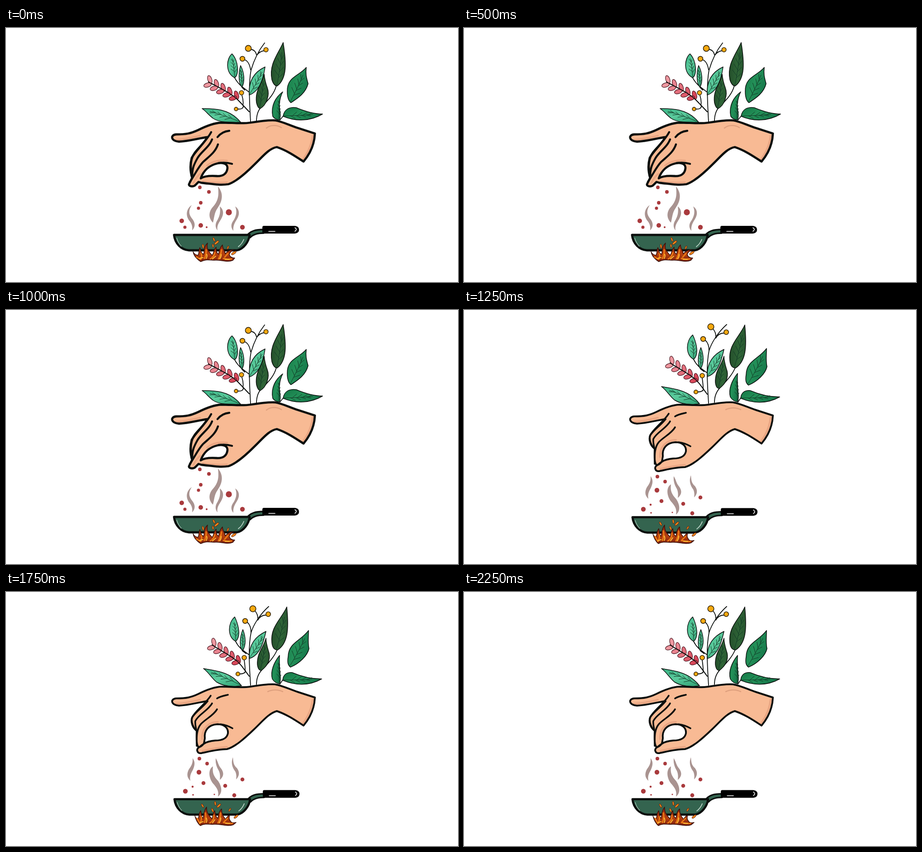
These frames come from a looping animation (998x561 px, 2.5 s). An HTML page:

```html
<!DOCTYPE html>
<html lang="en">
<head>
<meta charset="utf-8">
<title>Seasoning</title>
<style>
html, body { margin: 0; width: 100%; height: 100%; overflow: hidden; background: #fff; }
svg { display: block; width: 100%; height: 100%; }
</style>
</head>
<body>
<svg id="stage" viewBox="0 0 998 561">
  <defs>
    <linearGradient id="mint" x1="0" y1="0" x2="0.7" y2="1"><stop offset="0" stop-color="#35b283"/><stop offset=".55" stop-color="#5ccb9d"/><stop offset="1" stop-color="#39a97c"/></linearGradient>
    <linearGradient id="jade" x1="0" y1="0" x2="1" y2="0.6"><stop offset="0" stop-color="#137645"/><stop offset=".5" stop-color="#239058"/><stop offset="1" stop-color="#15774a"/></linearGradient>
    <linearGradient id="moss" x1="0" y1="0" x2="1" y2="0"><stop offset="0" stop-color="#244f2b"/><stop offset=".6" stop-color="#2f6537"/><stop offset="1" stop-color="#27552f"/></linearGradient>
    <linearGradient id="flame" x1="0" y1="0" x2="0" y2="1"><stop offset="0" stop-color="#8a2410"/><stop offset=".6" stop-color="#b5400f"/><stop offset="1" stop-color="#7c1f0d"/></linearGradient>
  </defs>
</svg>
<script>
const STEP = 250;
const INK = '#0b0f0d';

const path = (d, fill, stroke = 'none', width = 0) =>
  `<path d="${d}" fill="${fill}" stroke="${stroke}" stroke-width="${width}" stroke-linecap="round" stroke-linejoin="round"/>`;
const line = (d, width, color = INK) => path(d, 'none', color, width);
const dot = (x, y, r, fill, stroke = 'none', width = 0) =>
  `<circle cx="${x}" cy="${y}" r="${r}" fill="${fill}" stroke="${stroke}" stroke-width="${width}"/>`;
const oval = (x, y, rx, ry, turn, fill, stroke, width) =>
  `<ellipse rx="${rx}" ry="${ry}" transform="translate(${x} ${y}) rotate(${turn})" fill="${fill}" stroke="${stroke}" stroke-width="${width}"/>`;

// Midrib from base to tip, with short ribs pointing towards the tip.
function veins([x, y, tx, ty], spread) {
  const dx = tx - x, dy = ty - y;
  const at = (s, side) => `${x + dx * s - dy * side} ${y + dy * s + dx * side}`;
  let d = `M${at(0, 0)} Q${at(.45, .025)} ${at(.84, 0)}`;
  for (let i = 0; i < 4; i++) {
    const s = .2 + i * .15, w = spread * (1 - i * .17);
    d += `M${at(s, .01)}L${at(s + .13, w)}M${at(s + .05, .01)}L${at(s + .18, -w)}`;
  }
  return line(d, 1, '#123a26');
}

const leaf = ([d, tone, rib, spread]) =>
  path(d, `url(#${tone})`, INK, 1.5) + veins(rib, spread);

// Five pairs of petals along a stem.
function sprig({ upper, lower, tilt, stem }) {
  const tones = ['#ee98a0', '#e98490', '#e36f7c', '#de5b6b', '#d9485a'];
  let out = line(stem, 2);
  tones.forEach((tone, i) => {
    const k = i / 4;
    const mix = ([x, y, tx, ty]) => [x + (tx - x) * k, y + (ty - y) * k];
    out += oval(...mix(upper), 4.5, 9.3, tilt, tone, '#4a1620', 1.2);
    out += oval(...mix(lower), 8.6, 4.6, -16, tone, '#4a1620', 1.2);
  });
  return out + line(stem, 1.6);
}

const berries = list => list.map(b => dot(...b, '#f6a90f', '#33240a', 1.6)).join('');

function hand({ body, hole, folds, crease, shade, width }) {
  return path(body, '#f8ba94')
    + line(shade, 4, '#e9a683')
    + path(hole, '#fff', INK, width)
    + path(body, 'none', INK, width)
    + line(folds, width - .4)
    + line(crease, 2.6, '#dfa07e');
}

function pan(shift) {
  return `<g transform="translate(${shift} ${shift * .6})">`
    + path('M530 461C539 447 553 445 569 445V453C556 453 546 455 539 463Z', '#34644f', INK, 3.4)
    + path('M371 457H538C536 472 525 488 510 491H404C387 490 373 476 371 457Z', '#34644f', INK, 4.8)
    + path('M569 437H638Q647 438 647 445.500Q647 453 638 454H569Q566 454 566 450V441Q566 437 569 437Z', '#000')
    + line('M580 449.300H594', 1.5, '#fff') + line('M638 441Q644 445 638 449', 1.6, '#fff')
    + line('M377 464Q380 475 387 482', 1.4, '#9dbfae') + line('M525 467Q521 477 513 483', 1.7, '#c3d8cd')
    + '</g>';
}

const fire = ({ outer, inner, core, sparks }) =>
  path(outer, 'url(#flame)', '#3c120b', 1.5)
  + line(inner, 3, '#ec7914') + line(core, 2, '#ffc13a')
  + sparks.map(([x, y, turn, size]) => oval(x, y, size, size * .38, turn, '#f48a18', '#6b220d', 1)).join('');

function draw(p) {
  return line(p.stems, 1.8)
    + p.leaves.map(leaf).join('') + sprig(p.sprig) + berries(p.berries)
    + hand(p.hand)
    + p.steam.map(d => path(d, '#a99390')).join('')
    + p.spice.map(s => dot(...s, '#a93a3d')).join('')
    + pan(p.shift) + fire(p.fire);
}

const open = {
  shift: 0,
  stems: 'M540 207C538 170 535 125 541 93C546 76 556 52 571 33M541 47Q551 49 553 59M570 50Q559 52 554 60M527 70Q537 74 540 92'
    + 'M505 110C512 124 524 132 536 141M521 131L527 137M521 149Q525 162 523 171M512 179Q524 180 524 172'
    + 'M553 206C553 190 557 180 566 172C580 158 592 146 597 127M605 203L614 192',
  leaves: [
    ['M499 57C486 68 484 99 505 110C515 102 513 72 499 57Z', 'mint', [505, 108, 499, 60], .13],
    ['M518 83C513 100 513 121 521 131C528 118 526 98 518 83Z', 'mint', [521, 129, 518, 86], .08],
    ['M572 86C550 96 535 114 537 148C559 141 568 114 572 86Z', 'mint', [538, 146, 571, 88], .11],
    ['M612 32C601 57 580 80 587 114C590 124 594 128 599 128C621 111 619 76 612 32Z', 'moss', [598, 127, 611, 40], .12],
    ['M570 102C566 123 549 137 553 165C555 173 557 177 561 178C575 171 583 148 577 132C573 121 571 113 570 102Z', 'moss', [560, 176, 570, 106], .1],
    ['M663 87C646 107 620 108 621 140C621 155 624 161 629 165C646 154 662 143 667 123C664 111 661 104 663 87Z', 'jade', [628, 162, 661, 93], .14],
    ['M611 141C596 152 584 171 589 195C592 200 599 203 604 203C609 190 602 181 604 165C605 155 608 147 611 141Z', 'jade', [602, 201, 603, 153], .09],
    ['M612 195C614 180 625 174 641 176C660 184 680 190 699 190C672 206 640 207 612 195Z', 'jade', [613, 194, 690, 190], .09],
    ['M433 178C453 178 492 176 518 208C495 210 470 208 458 200C448 193 442 184 433 178Z', 'mint', [514, 206, 438, 180], .08]
  ],
  sprig: { upper: [450, 114, 509, 148], lower: [445, 126, 501, 155], tilt: -18, stem: 'M447 119C477 135 501 146 516 163L537 185' },
  berries: [[535, 45, 6.6], [574, 48, 4.8], [522, 68, 5.4], [520, 143, 4.8], [508, 179, 3.9]],
  hand: {
    width: 4.8,
    body: 'M376 235C398 235 408 233 425 225C443 216 458 210 475 209C499 209 520 212 540 209C565 205 580 203 594 204C611 207 624 214 645 221L682 233C681 258 672 277 657 295C637 282 619 270 598 263C580 266 566 285 548 302C525 325 506 340 491 345C471 348 453 344 432 342L425 340L419 346C414 352 403 350 404 345L411 331C407 318 406 302 410 287C418 272 433 260 445 241C427 243 405 250 382 251C364 250 362 236 376 235Z',
    hole: 'M430 332C436 315 449 303 467 299C481 296 489 301 489 309C488 321 480 328 465 327C450 326 438 327 430 332Z',
    folds: 'M453 230C443 249 427 262 417 275C407 289 407 305 410 327M455 246C448 264 432 272 423 287C414 303 411 311 411 330M468 257C462 275 448 284 435 296C424 308 418 322 406 340M470 298Q486 296 499 300M467 241C474 232 483 228 493 227',
    crease: 'M575 221C585 213 599 214 608 220',
    shade: 'M376 247Q400 245 428 238M677 238Q674 265 656 290M444 304Q460 290 488 293M435 339Q465 343 488 341M414 342Q420 329 429 322'
  },
  steam: [
    'M468 350C482 366 477 384 467 398C460 408 460 418 457 430C445 418 449 404 456 396C470 381 470 368 468 350Z',
    'M410 391C396 401 397 417 406 427C411 434 412 440 411 447C420 438 417 428 410 420C402 409 404 401 410 391Z',
    'M472 394C474 406 472 415 467 424C461 433 462 441 467 447C465 437 470 430 475 422C482 410 480 400 472 394Z',
    'M506 394C511 406 508 415 503 424C496 433 496 441 502 448C501 437 505 430 510 422C517 410 515 400 506 394Z'
  ],
  spice: [[428, 352, 3.9], [448, 362, 4], [430, 386, 3.9], [425, 398, 3.5], [492, 407, 6.7], [388, 426, 5], [395, 440, 3.5], [430, 436, 5], [443, 440, 2], [522, 440, 5.2]],
  fire: {
    outer: 'M413 494C415 504 422 511 430 516C441 510 449 513 459 513C474 511 488 519 501 513L505 508C497 508 494 505 493 500Q495 494 502 490C492 490 487 495 484 499C484 492 478 488 478 479C471 486 471 493 469 500C464 496 464 490 464 484C457 491 460 497 455 502C447 493 442 488 445 475C436 482 439 493 436 500C428 495 431 490 428 485C425 491 427 497 424 502Q416 501 413 494Z',
    inner: 'M421 506L430 511Q433 503 431 498M438 509Q443 500 442 490M451 510Q459 506 461 496M469 510Q475 500 476 490M480 509Q489 512 498 510M483 506L490 498',
    core: 'M427 509L435 507M442 509Q445 504 443 500M456 510L463 504M472 510Q476 504 475 500M484 511L493 511',
    sparks: [[459, 467, 70, 4.5], [465, 474, -40, 6], [435, 482, 80, 4.5], [457, 481, 80, 4], [490, 485, -70, 4], [503, 497, -35, 6]]
  }
};

const pinch = {
  shift: 1,
  stems: 'M540 206C538 170 534 125 541 90C546 73 560 50 580 32M550 42Q557 50 556 62M574 51Q562 51 556 62M533 67Q541 74 541 90'
    + 'M507 109C514 124 525 130 537 139M522 130L530 136M526 151Q528 164 528 173M516 181Q528 181 529 174'
    + 'M553 204C553 190 557 180 566 171C580 156 592 144 599 127M605 203L614 190',
  leaves: [
    ['M505 55C490 68 488 98 507 109C519 99 514 74 505 55Z', 'mint', [507, 107, 504, 60], .13],
    ['M523 83C516 100 515 121 522 130C531 118 529 98 523 83Z', 'mint', [522, 128, 523, 86], .08],
    ['M574 87C551 98 536 115 537 147C559 141 568 114 574 87Z', 'mint', [538, 145, 573, 90], .11],
    ['M620 33C608 60 583 77 587 112C588 122 592 128 600 128C622 113 625 84 620 33Z', 'moss', [597, 126, 618, 42], .12],
    ['M574 102C569 123 554 133 555 160C556 170 560 174 564 173C578 163 584 149 581 135C577 122 574 114 574 102Z', 'moss', [562, 171, 574, 107], .1],
    ['M668 85C650 109 624 112 623 142C621 155 622 161 628 166C648 158 666 140 669 125C666 112 668 99 668 85Z', 'jade', [627, 163, 666, 91], .14],
    ['M604 140C592 155 583 175 588 192C592 199 599 202 604 203C609 190 602 175 604 140Z', 'jade', [603, 201, 602, 148], .09],
    ['M611 195C612 182 620 177 632 178C655 188 675 192 697 192C672 206 643 208 611 195Z', 'jade', [612, 194, 688, 192], .09],
    ['M436 169C461 174 495 175 520 207C495 211 478 207 465 199C454 190 448 178 436 169Z', 'mint', [517, 205, 441, 172], .08]
  ],
  sprig: { upper: [459, 111, 513, 149], lower: [453, 123, 507, 156], tilt: -14, stem: 'M455 117C483 135 507 146 520 163L537 186' },
  berries: [[545, 37, 6.8], [579, 49, 5.2], [528, 64, 5.4], [526, 145, 5], [512, 181, 4.3]],
  hand: {
    width: 4,
    body: 'M376 235C398 235 408 233 425 225C443 216 458 210 475 209C499 209 520 212 540 209C565 205 580 203 594 204C611 207 624 214 645 221L682 233C681 258 672 277 657 295C637 282 619 270 598 263C580 268 566 286 548 303C526 324 506 342 488 347C468 347 450 352 431 356C422 357 419 347 426 343C419 339 421 319 421 306C413 301 407 288 411 277C419 264 433 256 445 241C427 243 405 250 382 251C364 250 362 236 376 235Z',
    hole: 'M439 323C437 306 447 293 467 292C483 292 491 301 490 312C488 323 478 328 462 328C451 329 443 331 437 335Z',
    folds: 'M452 229C440 248 418 262 411 277C408 288 414 300 420 306M455 246C445 263 425 270 418 285C417 295 420 299 420 305M466 259C458 273 440 281 430 292C420 304 421 322 421 340M438 332Q435 340 426 343Q433 337 440 333M474 292Q488 294 500 301M466 235C474 230 482 229 490 227',
    crease: 'M578 220C588 215 601 215 611 220',
    shade: 'M376 247Q400 245 428 238M677 238Q674 265 656 290M433 325C431 306 444 287 468 287M434 351Q465 344 488 342'
  },
  steam: [
    'M412 367C413 380 408 385 403 393C398 404 401 411 407 417C405 405 409 400 413 392C418 380 417 374 412 367Z',
    'M457 385C444 393 449 415 459 425C467 435 470 440 468 452C481 442 474 425 468 417C456 404 456 396 457 385Z',
    'M463 367C462 380 466 388 470 395C473 402 473 408 472 415C482 407 481 398 475 390C468 382 469 376 463 367Z',
    'M501 365C496 378 500 388 506 396C509 402 509 408 508 414C517 405 515 396 510 389C502 382 502 376 501 365Z'
  ],
  spice: [[427, 368, 4], [444, 379, 3.9], [426, 398, 5.2], [522, 414, 4.3], [436, 422, 4.3], [484, 428, 4.3], [412, 430, 2.3], [396, 440, 5.2], [413, 448, 1.8], [460, 447, 1.6], [504, 449, 4.4]],
  fire: {
    outer: 'M417 494C419 502 422 510 429 516C441 510 450 514 460 513C474 512 488 519 502 514L508 509C499 511 496 508 495 505Q491 500 494 493C488 495 487 499 485 502C479 495 476 490 476 479C469 486 469 493 468 500C462 496 462 489 461 483C456 489 457 496 455 501C446 492 442 485 443 475C437 482 437 491 435 500C430 494 432 490 430 483C424 491 427 496 424 501Q418 500 417 494Z',
    inner: 'M422 500L428 511Q433 503 431 496M438 509Q443 499 440 488M450 510Q459 506 459 493M468 510Q474 500 474 488M480 509Q491 512 500 511M482 507L489 500',
    core: 'M428 510L435 507M442 509Q445 504 442 499M456 510L461 503M471 510Q475 504 474 499M485 511L494 511',
    sparks: [[434, 472, 60, 4.5], [462, 467, 80, 4.5], [470, 472, -45, 5.5], [456, 482, 70, 4.5], [494, 481, -60, 4], [508, 496, -40, 5.5]]
  }
};

const stage = document.getElementById('stage');
const poses = [open, pinch].map(pose => {
  const group = document.createElementNS('http://www.w3.org/2000/svg', 'g');
  group.innerHTML = draw(pose);
  stage.append(group);
  return group;
});

function update(time) {
  const active = Math.floor(time / STEP) % poses.length;
  poses.forEach((group, i) => group.setAttribute('display', i === active ? 'inline' : 'none'));
}

function tick() {
  update(performance.now());
  requestAnimationFrame(tick);
}
tick();
</script>
</body>
</html>
```
